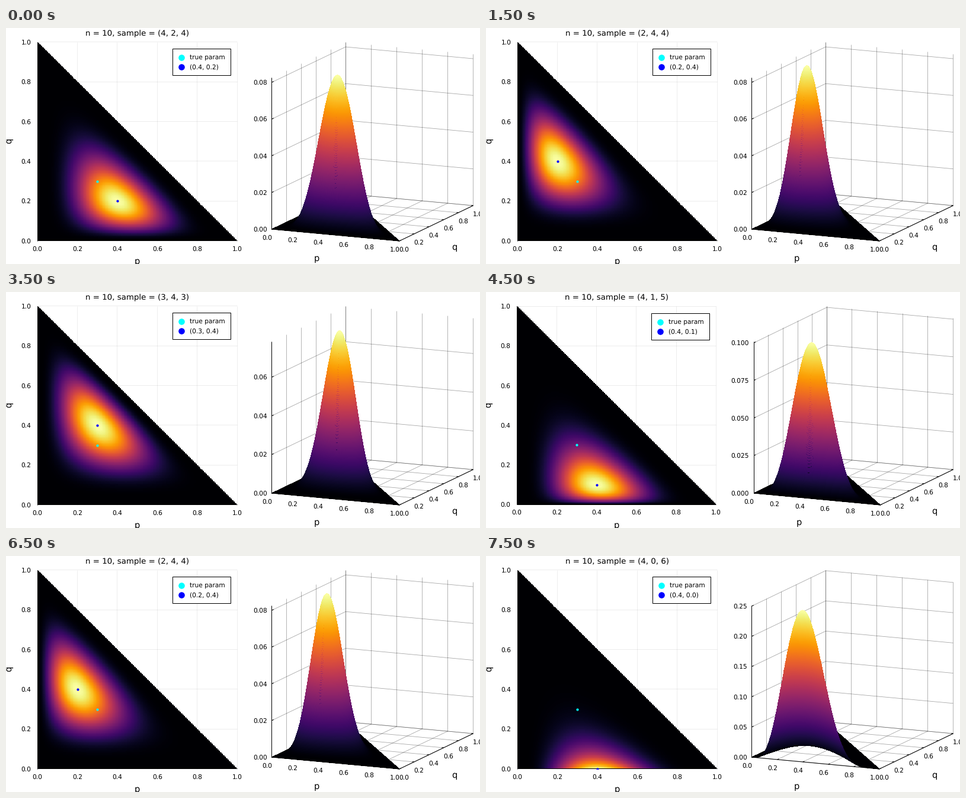
A matplotlib script for the animation above (8000 ms loop, 800 by 400 pixels).

```python
from math import factorial

import matplotlib.pyplot as plt
import numpy as np
from matplotlib.animation import FuncAnimation
from matplotlib.patches import Rectangle

W, H = 800, 400
PT = 0.72  # points per pixel at 100 dpi
TICK, TITLE, GUIDE = 10.67, 13.33, 14.67  # font sizes in pixels
TICKS = np.arange(6) / 5
N = 10
CELLS = 200
TRUE_PARAM = (0.3, 0.3)
SAMPLES = [
    (4, 2, 4), (3, 3, 4), (1, 3, 6), (2, 4, 4),
    (3, 3, 4), (2, 3, 5), (3, 3, 4), (3, 4, 3),
    (2, 4, 4), (4, 1, 5), (4, 1, 5), (2, 5, 3),
    (4, 4, 2), (2, 4, 4), (2, 5, 3), (4, 0, 6),
]

plt.rcParams["font.family"] = "DejaVu Sans"
plt.rcParams["text.hinting"] = "none"
fig = plt.figure(figsize=(W / 100, H / 100), dpi=100, facecolor="white")
ax = fig.add_axes([0, 0, 1, 1])

# Square grid for the heatmap, masked above the diagonal
steps = np.arange(CELLS + 1)
I, J = np.meshgrid(steps, steps)
OUTSIDE = I + J > CELLS
# Dense surface points, back to front, closer together near the edges
U, V = np.meshgrid((1 - np.cos(np.linspace(0, np.pi, 1300))) / 2,
                   np.linspace(1, 0, 900) ** 2)
MESH_P, MESH_Q = U * (1 - V), V


def likelihood(sample, p, q):
    a, b, c = sample
    r = np.clip(1 - p - q, 0, 1)
    ways = factorial(N) / (factorial(a) * factorial(b) * factorial(c))
    return ways * p**a * q**b * r**c


def text(x, y, s, size, ha="center", **kw):
    """Write s with its baseline at pixel (x, y)."""
    ax.text(x, y, s, size=size * PT, ha=ha, va="baseline", **kw)


def tick_text(x, y, s, ha="center"):
    text(x, y + 0.365 * TICK, s, TICK, ha)


def line(a, b, alpha=1.0, width=1.0, z=1):
    (x0, y0), (x1, y1) = a, b
    if x0 == x1:
        x0 = x1 = np.floor(x0)
    if y0 == y1:
        y0 = y1 = np.floor(y0)
    ax.plot([x0, x1], [y0, y1], color="black", alpha=alpha,
            lw=width * PT, zorder=z, solid_capstyle="butt")


def dot(x, y, color, diameter, z):
    return ax.plot([x], [y], "o", color=color, ms=diameter * PT, mew=0,
                   zorder=z)[0]


def heat_image(values, extent):
    return ax.imshow(values, cmap="inferno", vmin=0, vmax=1, zorder=2,
                     aspect="auto", interpolation="nearest",
                     origin="lower", extent=extent)


def draw_heatmap(sample, peak, wide):
    left, base, size = (52.2, 360.2, 336) if wide else (53.2, 360.7, 336.9)
    right, top = left + size, base - size
    half = size / CELLS / 2

    def at(p, q):
        return left + p * size, base - q * size

    for t in TICKS:
        line(at(t, 0), at(t, 1), alpha=0.07)
        line(at(0, t), at(1, t), alpha=0.07)
        tick_text(at(t, 0)[0], base + 13, f"{t:.1f}")
        tick_text(left - 10.5, at(0, t)[1], f"{t:.1f}", "right")

    values = likelihood(sample, I / CELLS, J / CELLS) / peak
    image = heat_image(np.ma.array(values, mask=OUTSIDE),
                       (left - half, right + half, base + half, top - half))
    line((left, base), (left, top), z=3)
    line((left, base), (right, base), z=3)

    p, q = sample[0] / N, sample[1] / N
    frame = Rectangle((left, top), size, size, transform=ax.transData)
    for artist in (image, dot(*at(*TRUE_PARAM), "cyan", 4.2, 4),
                   dot(*at(p, q), "blue", 4.2, 4)):
        artist.set_clip_path(frame)

    mid = (left + right) / 2
    text(mid, 12.9, f"n = {N}, sample = ({', '.join(map(str, sample))})", TITLE)
    text(mid, 400, "p", GUIDE)
    text(8.5 if wide else 9.5, 191, "q", GUIDE,
         rotation=90, rotation_mode="anchor")

    # Legend
    x, y = (279, 36) if wide else (281, 35)
    ax.add_patch(Rectangle((x, y), 98, 45, fc="white", ec="black",
                           lw=PT, zorder=5))
    rows = [("cyan", "true param"), ("blue", f"({p:.1f}, {q:.1f})")]
    for k, (color, label) in enumerate(rows):
        cy = y + 15.2 + 15.3 * k
        dot(x + 15.2, cy, color, 10.6, 6)
        text(x + 29, cy + 4, label, TICK, "left", zorder=6)


def draw_surface(sample, peak, wide):
    ox, px, qx = (452.2, 213.2, 123) if wide else (448.7, 215.2, 124.5)

    def at(p, q, h=0):
        return ox + p * px + q * qx, 341 + 20 * p - 60 * q - 257 * h

    def grid(a, b):
        line(at(*a), at(*b), alpha=0.36, width=0.8)

    for t in TICKS:
        label = f"{t:.1f}"
        grid((t, 0), (t, 1))
        grid((0, t), (1, t))
        grid((t, 1, 0), (t, 1, 1))
        grid((0, t, 0), (0, t, 1))
        line(at(t, 0), at(t, 0.02))
        line(at(1, t), at(0.985, t))
        x, y = at(t, 0)
        tick_text(x - 8, y + 14, label)
        x, y = at(1, t)
        tick_text(x + 8, y + 14, label)

    step = 0.02 if peak < 0.1 else 0.025 if peak < 0.125 else 0.05
    for z in np.arange(0, peak, step):
        h = z / peak
        grid((0, 0, h), (0, 1, h))
        grid((0, 1, h), (1, 1, h))
        line(at(0, 0, h), at(0, 0.025, h))
        tick_text(ox - 8, at(0, 0, h)[1], f"{z:.{3 if wide else 2}f}", "right")

    line(at(0, 0), at(0, 0, 1), z=3)
    line(at(0, 0), at(1, 0), z=3)
    line(at(1, 0), at(1, 1), z=3)

    # Project every point; nearer points overwrite those behind them
    h = likelihood(sample, MESH_P, MESH_Q) / peak
    x, y = at(MESH_P, MESH_Q, h)
    heights = np.full((H, W), np.nan)
    heights[y.astype(int).ravel(), x.astype(int).ravel()] = h.ravel()
    heat_image(np.ma.masked_invalid(heights), (0, W, 0, H))

    text(ox + 76, 395, "p", GUIDE)
    text(757, 375.5, "q", GUIDE)


def draw(i):
    ax.clear()
    ax.set_axis_off()
    ax.set_xlim(0, W)
    ax.set_ylim(H, 0)
    sample = SAMPLES[i]
    peak = likelihood(sample, sample[0] / N, sample[1] / N)
    wide = 0.1 < peak < 0.125  # three-decimal height labels
    draw_heatmap(sample, peak, wide)
    draw_surface(sample, peak, wide)
    return []


anim = FuncAnimation(fig, draw, frames=len(SAMPLES), interval=500,
                     repeat=True, repeat_delay=0, cache_frame_data=False)
plt.show()
```
